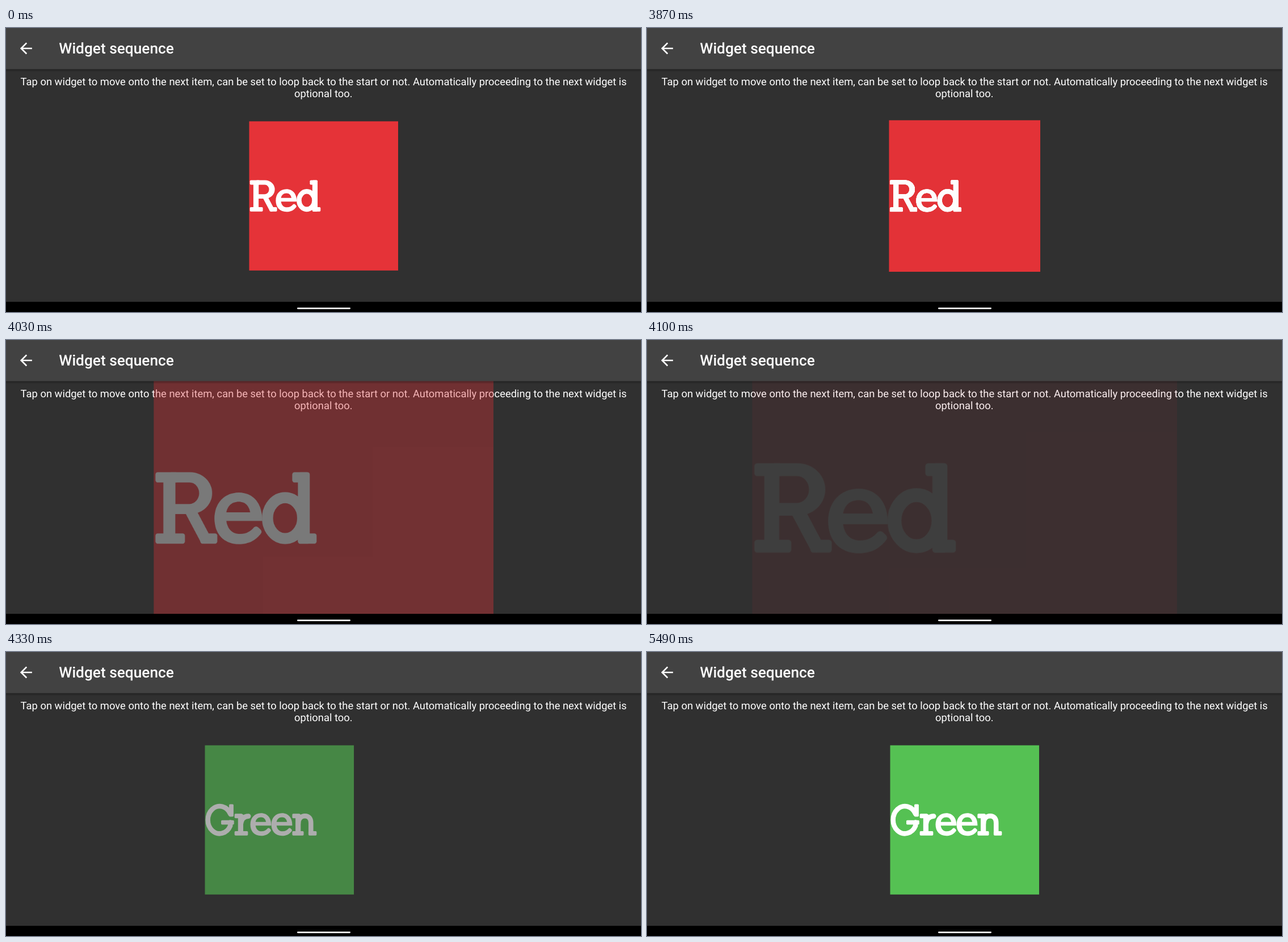
These frames come from a looping animation (1119 px wide and 501 px high, 8000 ms). An HTML page:

```html
<!DOCTYPE html>
<html lang="en">
<head>
<meta charset="utf-8">
<title>Widget sequence</title>
<style>
  html, body { margin: 0; width: 100%; height: 100%; overflow: hidden; background: #303030; }
  svg { display: block; width: 100%; height: 100%; }
  text { font-family: Roboto, sans-serif; fill: #fff; text-rendering: geometricPrecision; }
  .title { font-size: 26.25px; font-weight: 500; }
  .hint { font-size: 18.4px; text-anchor: middle; }

  .card { transform-origin: 559.75px 296.2px; }
  .red { fill: #e53338; animation: zoom-out 8s cubic-bezier(.37, 0, .63, 1) infinite; }
  .green { fill: #55c153; animation: slide-in 8s cubic-bezier(.37, 0, .63, 1) infinite; }
  .word { fill: #fff; fill-rule: evenodd; }
  .word rect { rx: 4px; }
  .pen {
    fill: none; stroke: #fff; stroke-width: 19.5;
    stroke-linecap: round; stroke-linejoin: round;
  }

  @keyframes zoom-out {
    0%, 48.175% { transform: scale(1); opacity: 1; }
    51.925%, 100% { transform: scale(3); opacity: 0; }
  }
  @keyframes slide-in {
    0%, 51.838% { transform: translateX(-196.9px); opacity: 0; }
    55.9%, 100% { transform: translateX(0); opacity: 1; }
  }
</style>
</head>
<body>
<svg viewBox="0 0 1119 501" preserveAspectRatio="none">
  <defs>
    <linearGradient id="shade" x2="0" y2="1">
      <stop stop-color="#000" stop-opacity=".3"/>
      <stop offset="1" stop-color="#000" stop-opacity="0"/>
    </linearGradient>
    <path id="e" d="M84 319H21C23 334 32 342 45 342C56 342 63 338 70 330Q74 327 78 331L82 335Q84 338 82 341C73 353 61 360 43 360C16 360 0 341 0 315C0 288 17 269 43 269C69 269 85 289 84 319ZM21 304H63C61 292 54 285 43 285C31 285 23 292 21 304Z"/>
  </defs>

  <rect width="1119" height="501" fill="#303030"/>
  <text class="hint" x="559.7" y="100.6">Tap on widget to move onto the next item, can be set to loop back to the start or not. Automatically proceeding to the next widget is</text>
  <text class="hint" x="559.3" y="121.6">optional too.</text>

  <g class="card red">
    <rect x="428.5" y="164.6" width="262.5" height="263.2"/>
    <!-- slab lettering -->
    <g class="word" role="img" aria-label="Red" transform="translate(428.5 296.2) scale(.4384) translate(0 -296)">
      <rect x="3" y="233" width="40" height="18"/>
      <rect x="17" y="240" width="21" height="110"/>
      <rect x="3" y="341" width="52" height="18"/>
      <path d="M30 233H64A39 37 0 0 1 64 307H30ZM38 251H63A17 19 0 0 1 63 289H38Z"/>
      <path class="pen" d="M64 300L90 349"/>
      <rect x="82" y="341" width="30" height="18"/>
      <use href="#e" x="107"/>
      <ellipse class="pen" cx="231.5" cy="314" rx="31" ry="36"/>
      <rect x="244" y="233" width="30" height="18"/>
      <rect x="254" y="233" width="21" height="126"/>
      <rect x="254" y="341" width="33" height="18"/>
    </g>
  </g>

  <g class="card green">
    <rect x="428.5" y="164.6" width="262.5" height="263.2"/>
    <g class="word" role="img" aria-label="Green" transform="translate(428.5 296.2) scale(.4384) translate(0 -296)">
      <path class="pen" d="M102 272A47.5 55 0 1 0 102 320V306"/>
      <rect x="97" y="233" width="18" height="50"/>
      <rect x="65" y="297" width="52" height="18"/>
      <rect x="119" y="271" width="32" height="18"/>
      <rect x="133" y="273" width="21" height="80"/>
      <rect x="119" y="341" width="54" height="18"/>
      <path class="pen" d="M144 314Q148 281 175 281"/>
      <use href="#e" x="182.5"/>
      <use href="#e" x="267"/>
      <rect x="351" y="271" width="32" height="18"/>
      <rect x="364" y="273" width="21" height="80"/>
      <rect x="351" y="341" width="46" height="18"/>
      <path class="pen" d="M375 312C375 290 388 280 402 280C418 280 426 291 426 308V348"/>
      <rect x="416" y="341" width="33" height="18"/>
    </g>
  </g>

  <rect y="72.5" width="1119" height="5" fill="url(#shade)"/>
  <rect width="1119" height="72.5" fill="#424242"/>
  <path fill="#fff" transform="translate(19.6 20.2) scale(1.3125)" d="M20 11H7.83l5.59-5.59L12 4l-8 8 8 8 1.41-1.41L7.83 13H20z"/>
  <text class="title" x="93.3" y="45.3">Widget sequence</text>

  <rect y="483" width="1119" height="18"/>
  <rect x="513" y="493.2" width="94" height="2.8" rx="1.4" fill="#fff"/>
</svg>
</body>
</html>
```
